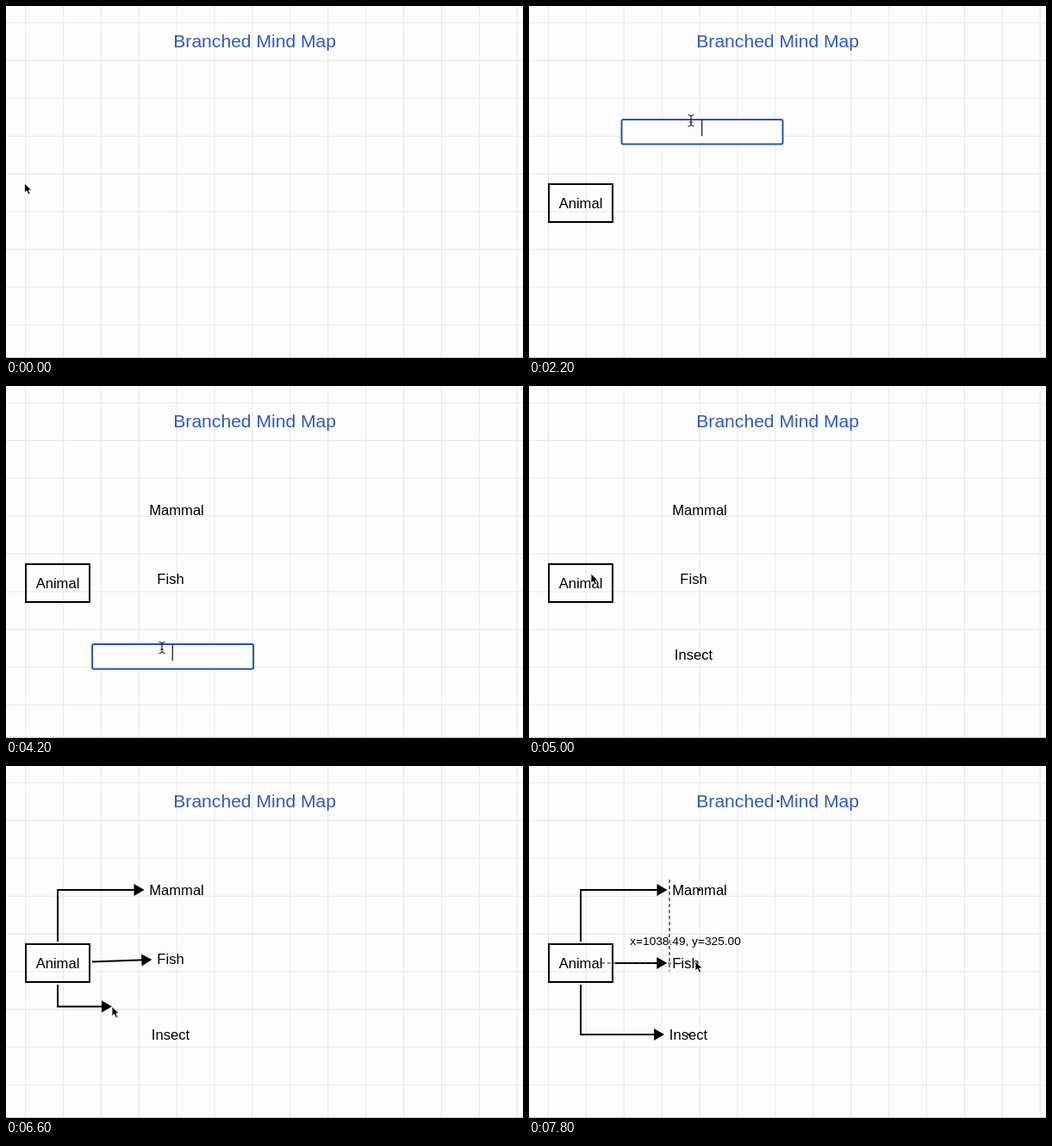
Animation of 600x409 px, one loop 8 s. Source, as an HTML page:

```html
<!DOCTYPE html>
<html lang="en">
<head>
<meta charset="utf-8">
<title>Branched Mind Map</title>
<style>
html, body { margin: 0; width: 100%; height: 100%; overflow: hidden; background: #fefdfe; }
svg { display: block; width: 600px; height: 409px; font-family: "Liberation Sans", Helvetica, Arial, sans-serif; }
text { text-anchor: middle; }
.label { font-size: 16.6px; }
.tip { font-size: 13.7px; }
.line { fill: none; stroke: #000; stroke-width: 2; }
.guide { stroke: #222; stroke-width: 1.2; stroke-dasharray: 4 3; }
.editor { fill: #fefdfe; stroke: #2458ad; stroke-width: 2; }
</style>
</head>
<body>
<svg viewBox="0 0 600 409">
  <g id="grid" stroke="#e9e8ef" stroke-width="1.1"></g>
  <path d="M0 408.3H600" stroke="#cfced3" stroke-width="1.2"/>
  <text x="288.7" y="47.7" font-size="21.1" fill="#3159bf">Branched Mind Map</text>
  <g id="scene"></g>
</svg>
<script>
const LOOP = 8000, STEP = 200;
const byId = id => document.getElementById(id);

let grid = "";
for (let x = 22.5; x < 600; x += 43.9) grid += `M${x} 0V408`;
for (let y = 19.5; y < 400; y += 43.9) grid += `M0 ${y}H600`;
byId("grid").innerHTML = `<path d="${grid}"/>`;

// Pointer route: step, x, y
const route = [
  [0, 21.5, 206], [1, 22, 206], [3, 97, 251], [4, 64, 228], [7, 75, 235], [10, 188, 133],
  [13, 190, 150], [15, 204, 211], [16, 186, 214], [18, 190, 226], [20, 181, 304],
  [23, 170, 306], [25, 72, 218], [26, 62, 208], [28, 172, 144], [29, 97, 218],
  [31, 180, 224], [32, 62, 246], [34, 184, 313], [35, 178, 315], [36, 179, 314],
  [37, 202, 227], [39, 193, 227]
];

// Typing sessions: text, first step, end step, editor centre
const sessions = [
  ["Mammal", 11, 14, 200.7, 146.2],
  ["Fish", 17, 19, 193.3, 227],
  ["Insect", 21, 24, 193.3, 314.3]
];

const mix = (a, b, k) => a + (b - a) * k;
const within = (n, from, to) => n >= from && n < to;

function pointerAt(n) {
  const i = Math.max(1, route.findIndex(p => p[0] >= n));
  const [a, b] = [route[i - 1], route[i]];
  const k = (n - a[0]) / (b[0] - a[0]);
  return [mix(a[1], b[1], k), mix(a[2], b[2], k)];
}

const label = (s, x, y, cls = "label") => `<text class="${cls}" x="${x}" y="${y}">${s}</text>`;
const node = (s, x, y) => label(s, x, y + 5.7);
const guide = (x1, y1, x2, y2) => `<path class="guide" d="M${x1} ${y1}L${x2} ${y2}"/>`;
const dot = (x, y) => `<path class="line" d="M${x - 1.5} ${y}h3"/>`;
const caret = (x, y) => `<path d="M${x} ${y}v19" stroke="#222" stroke-width="1.3"/>`;

// Polyline with a head on its last segment
function arrow(...pts) {
  const [a, b] = pts.slice(-2);
  const deg = Math.atan2(b[1] - a[1], b[0] - a[0]) * 180 / Math.PI;
  const len = Math.hypot(b[0] - a[0], b[1] - a[1]) || 1;
  const k = Math.max(0, 1 - 8 / len);
  const end = [mix(a[0], b[0], k), mix(a[1], b[1], k)];
  return `<path class="line" d="M${[...pts.slice(0, -1), end].join("L")}"/>` +
    `<path d="M0 0L-12 -7V7Z" transform="translate(${b}) rotate(${deg})"/>`;
}

function editor(s, x, y) {
  const half = s.length * 4.9;
  return `<rect class="editor" x="${x - 93.2}" y="${y - 14.2}" width="187" height="28.6" rx="2"/>` +
    label(s, x, y + 1.5) + caret(x + half * 0.95, y - 14);
}

function pointer(x, y, beam) {
  const at = `transform="translate(${x} ${y})"`;
  if (beam) {
    return `<path ${at} d="M-3.5 -6.5Q0 -6.5 0 -4Q0 -6.5 3.5 -6.5M0 -4.5V4.5M-3.5 6.5Q0 6.5 0 4Q0 6.5 3.5 6.5M-2 2H2"
      fill="none" stroke="#222" stroke-width="1.2"/>`;
  }
  return `<path ${at} d="M0 0V11L2.6 8.7L4.6 13L6.6 12L4.7 8H8.2Z" fill="#000" stroke="#fff" stroke-width=".8"/>`;
}

function coords(x, y) {
  const scale = 91 / 83;
  const px = (1040.99 + (x - 185) * scale * 0.76).toFixed(2);
  const py = (416 + (y - 312) * scale).toFixed(2);
  return label(`x=${px}, y=${py}`, x - 0.5, y - 21.2, "tip");
}

function animalBox(n, px, py) {
  if (n < 2) return "";
  const w = n < 3 ? px - 23 : 74, h = n < 3 ? py - 207 : 44;
  const s = "Animal".slice(0, Math.max(0, n - 4) * 3);
  return `<rect class="line" x="23" y="207" width="${w}" height="${h}"/>` + node(s, 60, 229) +
    (within(n, 4, 7) ? caret(60 + s.length * 4.2, 219) : "");
}

function draw(n) {
  const [px, py] = pointerAt(n);
  const fishX = n < 38 ? 191 : n < 39 ? 186 : 182;
  const fishY = n < 38 ? 224.5 : n < 39 ? 227 : 229;
  const insectX = n < 35 ? 191 : 185;
  const places = [[198, 144], [fishX, fishY], [insectX, 312]];
  let out = animalBox(n, px, py);

  sessions.forEach(([s, from, to, x, y], i) => {
    if (within(n, from, to)) out += editor(s.slice(0, (n - from) * (s === "Fish" ? 4 : 3)), x, y);
    if (n >= to) out += node(s, ...places[i]);
  });

  if (n === 27) out += arrow([60, 204], [60, py], [px, py]);
  if (n >= 28) out += arrow([60, 204], [60, 144], [160.5, 144]);
  if (n === 30) out += arrow([100, 227.5], [px, py]);
  if (n >= 31) out += arrow([100, n < 39 ? 227.5 : 229], [fishX - 21.7, fishY + (n < 39 ? 0.5 : 0)]);
  if (n === 33) out += arrow([60, 254], [60, py], [px, py]);
  if (n >= 34) out += arrow([60, 254], [60, 312], [insectX - 28, 312]);

  if (n === 35) out += guide(0, 312, 190, 312) + guide(210, 212, 210, 324) + coords(insectX, 312);
  if (n === 39) out += guide(84, 229, 185, 229) + guide(163, 132, 163, 238) + dot(185, 312);
  if (n >= 38) out += coords(fishX, fishY);
  if (n === 35 || n >= 38) out += dot(289, 41) + dot(198, 144);

  const typing = within(n, 5, 7) || sessions.some(([, from, to]) => within(n, from + 1, to));
  const beam = n === 4 || sessions.some(s => s[1] === n);
  if (!typing) {
    const held = n === 11 ? [188, 133] : n === 21 ? [181, 304] : [px, py];
    out += pointer(...held, beam);
  }
  byId("scene").innerHTML = out;
}

let last = -1;
function tick() {
  const n = Math.floor(performance.now() % LOOP / STEP);
  if (n !== last) draw(last = n);
  requestAnimationFrame(tick);
}
tick();
</script>
</body>
</html>
```
